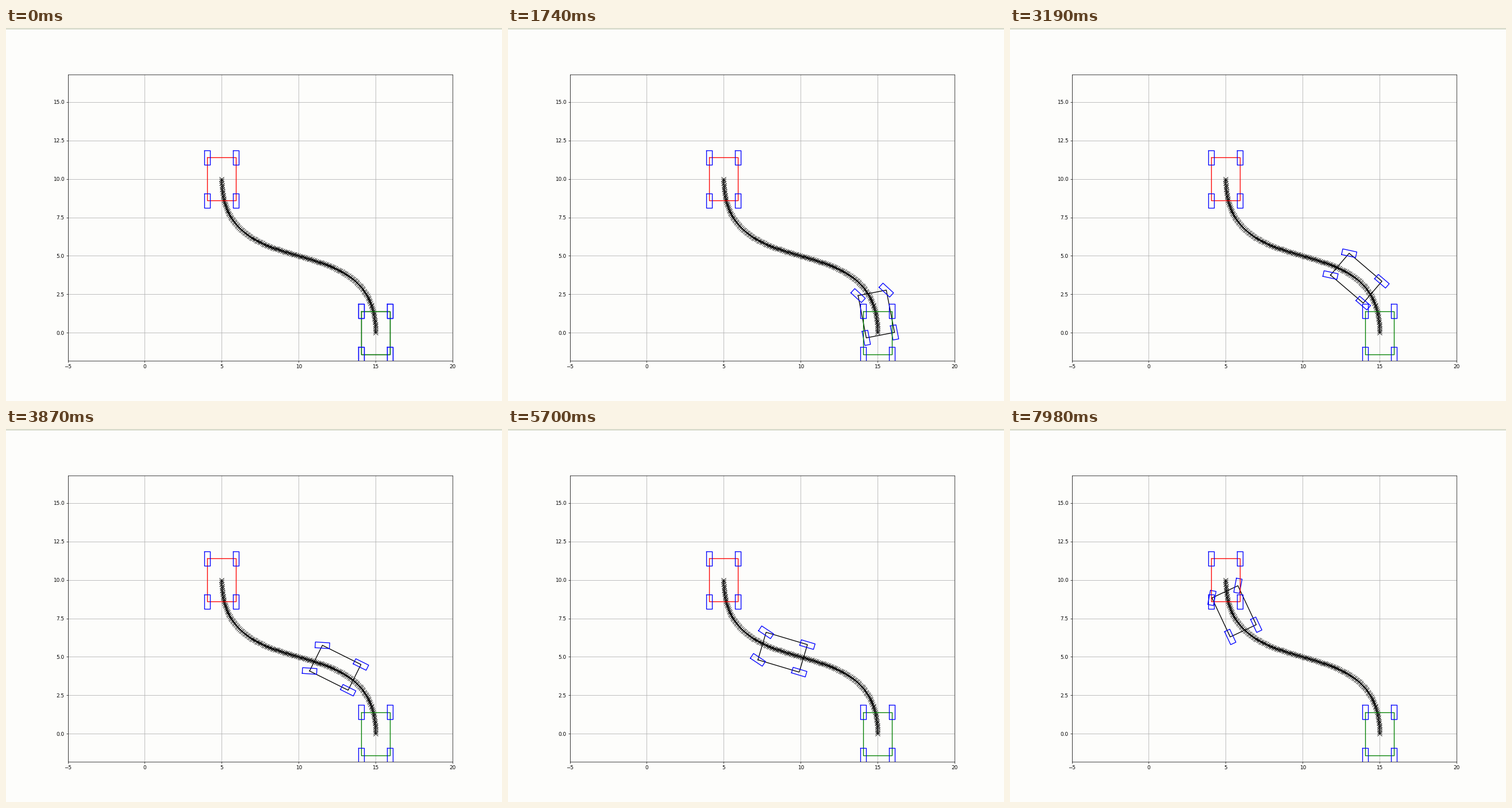
These frames come from a looping animation (863 px wide and 649 px high, 8 s). A matplotlib script:

```python
import numpy as np
import matplotlib.pyplot as plt
from matplotlib.animation import FuncAnimation

W, H, DPI = 863, 649, 64
FRAMES, STEP = 160, 50
LENGTH = 2.8
WIDTH = LENGTH * 2 / 3
BG = "#fdfdfb"

# time, x, y, heading and steering (degrees, left positive), speed
KEYS = np.array([
    [0.25, 15.00, 0.00, 90.0, 0, 0.00],
    [1.20, 14.99, 0.55, 92.0, 16, 1.14],
    [1.74, 14.90, 1.29, 102.1, 38, 1.80],
    [3.19, 13.42, 3.60, 140.3, 28, 1.92],
    [4.59, 11.05, 4.80, 165.2, 17, 1.98],
    [5.70, 8.83, 5.30, 163.4, -17, 2.00],
    [6.62, 7.20, 6.05, 146.5, -28, 1.94],
    [7.98, 5.52, 8.01, 114.3, -36, 1.92],
])
TIMES = KEYS[:, 0]
X, Y = KEYS[:, 1], KEYS[:, 2]
YAW, STEER = np.radians(KEYS[:, 3]), np.radians(KEYS[:, 4])
SPEED = KEYS[:, 5]

POSE = np.stack([X, Y, YAW], axis=1)
RATE = np.stack([SPEED * np.cos(YAW), SPEED * np.sin(YAW),
                 SPEED * np.tan(STEER) / LENGTH], axis=1)


def pose_at(t):
    """Bicycle-model pose: cubic Hermite between the key poses."""
    t = np.clip(t, TIMES[0], TIMES[-1])
    k = min(np.searchsorted(TIMES, t, side="right") - 1, len(TIMES) - 2)
    dt = TIMES[k + 1] - TIMES[k]
    u = (t - TIMES[k]) / dt
    blend = u * u * (3 - 2 * u)
    pose = (POSE[k] * (1 - blend) + POSE[k + 1] * blend
            + dt * RATE[k] * u * (1 - u) ** 2
            - dt * RATE[k + 1] * u * u * (1 - u))
    return (*pose, np.interp(t, TIMES, STEER))


def box(cx, cy, length, width, angle):
    """Closed outline of a rotated rectangle."""
    a = np.array([1, 1, -1, -1, 1]) * length / 2
    b = np.array([1, -1, -1, 1, 1]) * width / 2
    c, s = np.cos(angle), np.sin(angle)
    return cx + a * c - b * s, cy + a * s + b * c


def car_outlines(x, y, yaw, steer=0.0):
    """Body first, then the four wheels centred on its corners."""
    body = box(x, y, LENGTH, WIDTH, yaw)
    turns = (steer, steer, 0, 0)
    wheels = [box(body[0][i], body[1][i], LENGTH / 3, WIDTH / 5, yaw + turn)
              for i, turn in enumerate(turns)]
    return [body] + wheels


def draw_car(ax, color, pose):
    return [ax.plot(*xy, color=color if i == 0 else "b", lw=1.5)[0]
            for i, xy in enumerate(car_outlines(*pose))]


def bezier(points, n):
    p0, p1, p2, p3 = np.array(points, float)
    t = np.linspace(0, 1, n)[:, None]
    return ((1 - t) ** 3 * p0 + 3 * t * (1 - t) ** 2 * p1
            + 3 * t ** 2 * (1 - t) * p2 + t ** 3 * p3).T


fig = plt.figure(figsize=(W / DPI, H / DPI), dpi=DPI, facecolor=BG)

# window edge along the top
for row, color in ((0, "#e9ebdf"), (1, "#c6cab6"), (2, "#eff0e8")):
    fig.add_artist(plt.Rectangle((0, 1 - (row + 1) / H), 1, 1 / H, lw=0,
                                 color=color, transform=fig.transFigure))

ax = fig.add_axes([107.5 / W, 70.5 / H, 669.5 / W, 498 / H], facecolor=BG)
ax.set_xlim(-5, 20)
ax.set_ylim(-1.8, 16.8)
ax.set_xticks(range(-5, 21, 5))
ax.set_yticks(np.arange(0, 15.1, 2.5))
ax.grid(True, color="#b0b0b0", lw=0.9)

reach = np.hypot(10, 10) / 2
path = bezier([(15, 0), (15, reach), (5, 10 - reach), (5, 10)], 150)
ax.plot(*path, "-xk", ms=8, lw=1.5, mew=1)

car = draw_car(ax, "k", pose_at(0))
draw_car(ax, "g", (15, 0, np.pi / 2))
draw_car(ax, "r", (5, 10, np.pi / 2))


def update(i):
    for line, xy in zip(car, car_outlines(*pose_at(i * STEP / 1000))):
        line.set_data(*xy)
    return car


anim = FuncAnimation(fig, update, frames=FRAMES, interval=STEP,
                     repeat=True, repeat_delay=0, blit=False)
plt.show()
```
